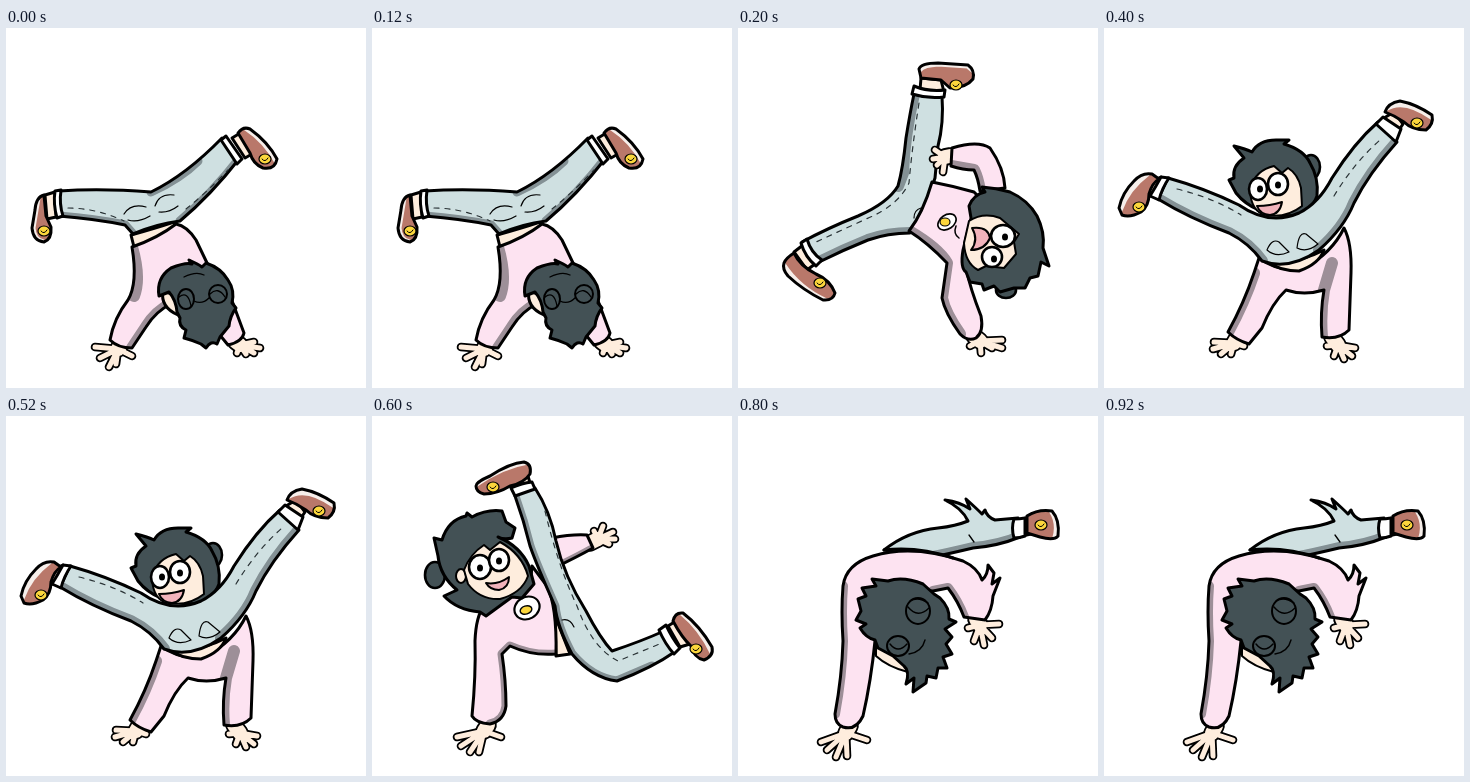
These frames come from a looping animation (360 px wide and 360 px high, 1000 ms). An HTML page with a canvas:

```html
<!DOCTYPE html>
<html lang="en">
<head>
<meta charset="utf-8">
<title>Cartwheel</title>
<style>
html, body { margin: 0; height: 100%; overflow: hidden; background: #fff; }
canvas { display: block; width: 360px; height: 360px; }
</style>
</head>
<body>
<canvas id="stage" width="360" height="360"></canvas>
<script>
const g = document.getElementById('stage').getContext('2d');
g.lineJoin = g.lineCap = 'round';

const SKIN = '#feeddd', PINK = '#fde3f1', BLUE = '#cfe0e1', HAIR = '#435155',
      SHOE = '#b9786a', WHITE = '#fff', YOLK = '#fbd63c', TONGUE = '#f2b3bb',
      SHADE = { [PINK]: '#9d8f98', [BLUE]: '#849195', [SHOE]: '#f6eeea' };

function line(d, width = 2, color = '#000') {
  g.strokeStyle = color;
  g.lineWidth = width;
  g.stroke(new Path2D(d));
}

function dashes(d) {
  g.setLineDash([5, 6]);
  line(d, 1.2, '#2a3336');
  g.setLineDash([]);
}

// Outlined shape; the optional edge is a band clipped to its inside.
function part(color, d, edge, band = 12, width = 3) {
  const path = new Path2D(d);
  g.fillStyle = color;
  g.fill(path);
  if (edge) {
    g.save();
    g.clip(path);
    line(edge, band, SHADE[color]);
    g.restore();
  }
  line(d, width);
}

function oval(color, x, y, rx, ry = rx, width = 2, turn = 0) {
  g.beginPath();
  g.ellipse(x, y, rx, ry, turn, 0, 7);
  if (color) { g.fillStyle = color; g.fill(); }
  if (width) { g.strokeStyle = '#000'; g.lineWidth = width; g.stroke(); }
}

function eye(x, y, rx, ry, px, py) {
  oval(WHITE, x, y, rx, ry, 2.6);
  oval('#000', px, py, 3, 3.6, 0);
}

function shoe(d, sole, x, y) {
  part(SHOE, d, sole, 7);
  oval(YOLK, x, y, 6, 5, 1.2);
  line(`M${x - 3},${y}q3,4 6,-1`, 1);
}

function hand(wrist, palm, ...tips) {
  const fingers = tips.map(t => `M${palm}L${t}`).join('');
  for (const [color, grow] of [['#000', 3.6], [SKIN, 0]]) {
    line(`M${wrist}L${palm}`, 14 + grow, color);
    line(fingers, 5 + grow, color);
  }
}

const poses = [
  () => {
    hand('116,314', '112,321', '89,319', '94,330', '103,339', '110,336', '126,328');
    hand('230,314', '234,317', '231,325', '240,326', '248,325', '254,320', '248,314');
    part(SKIN, 'M125,207Q150,200 168,194L171,198Q150,212 128,219Z');
    part(PINK, 'M126,219Q152,210 170,196Q181,198 190,212L202,237L222,262L238,305Q236,314 222,317L200,290L165,276Q150,283 140,299L126,320Q112,320 104,312Q108,290 122,272Q132,255 126,219Z',
      'M126,219Q135,250 128,268M126,320L140,299Q150,283 165,276');
    part(BLUE, 'M53,163Q95,160 145,164Q180,147 216,110L233,131Q205,167 174,193Q150,196 127,206L119,197Q90,191 53,188Z',
      'M53,188Q90,191 119,197L127,206M233,131Q205,167 174,193M145,164Q175,150 192,133', 9);
    dashes('M62,180Q90,180 118,193');
    dashes('M180,181Q200,165 222,142');
    line('M118,186Q125,175 140,179M122,192Q132,195 144,188M149,178Q153,165 168,167M153,184Q163,185 172,178', 1.2);
    part(SKIN, 'M39,167L49,164L50,189L41,191Z');
    part(WHITE, 'M49,163L55,162Q53,176 57,188L51,190Q47,176 49,163Z');
    shoe('M38,167Q30,169 29,182L26,200Q27,213 38,214Q46,211 45,199L40,188Z', 'M31,170L26,200Q27,213 37,215', 38, 203);
    part(SKIN, 'M226,110L236,104L246,126L239,130Z');
    part(WHITE, 'M215,112L220,108L236,131L231,136Z');
    shoe('M232,105Q237,98 244,101Q262,114 271,131Q269,142 257,140Q247,136 244,125Z', 'M240,99Q260,112 272,134', 259, 131);
    part(SKIN, 'M157,263Q154,279 172,287L178,270Z');
    part(HAIR, 'M153,268Q150,250 165,240Q180,234 186,236L183,232Q192,236 196,239L200,235Q215,240 222,252Q229,262 226,275L230,280Q224,288 223,298L214,309L211,316Q205,312 200,320L195,316Q186,312 178,310L180,302Q172,298 174,290L171,284Q170,272 163,264Z');
    oval(null, 180, 271, 8, 10);
    oval(null, 212, 266, 9);
    line('M173,269Q182,262 185,278M204,266Q212,258 219,269M188,273Q196,277 203,270M178,249Q190,243 198,247', 1.3);
  },
  () => {
    part(SKIN, 'M183,50L203,52L206,64L182,62Z');
    shoe('M181,41Q183,35 200,35L230,37Q237,42 235,51Q228,60 212,60L203,52L183,50Z', 'M181,41Q185,36 200,35L230,37L236,42', 218, 57);
    part(BLUE, 'M176,66Q190,70 204,68Q206,95 200,118L197,150Q190,175 172,205Q150,205 130,212Q105,222 79,235Q68,226 64,214Q90,200 120,188Q150,175 160,158Q165,140 168,110Q172,85 176,66Z',
      'M176,66Q166,110 165,145L160,158M172,205Q150,205 130,212Q105,222 79,235');
    dashes('M181,75Q174,120 171,155Q160,178 128,191L78,214');
    line('M183,180Q176,182 176,190', 1.2);
    part(WHITE, 'M176,58Q190,64 207,62L206,69Q190,71 174,66Z');
    part(SKIN, 'M56,224L65,217Q69,230 77,236L69,242Z');
    part(WHITE, 'M63,215L69,211Q73,225 84,232L78,238Q67,229 63,215Z');
    shoe('M46,235Q48,230 56,225Q62,238 78,246Q92,252 97,265Q95,273 85,272Q65,262 50,248Q44,241 46,235Z', 'M45,238Q60,261 88,274', 82, 255);
    hand('236,308', '242,313', '232,318', '243,325', '254,320', '264,320', '264,312');
    part(PINK, 'M194,154Q215,158 236,164L242,170L228,240Q232,260 243,288Q246,304 238,310Q230,314 222,306Q207,285 204,270L209,235Q190,215 171,203Q185,185 194,154Z',
      'M171,203Q200,220 209,235L204,270Q207,285 222,306');
    hand('212,128', '207,129', '197,122', '195,131', '199,137', '205,144');
    part(PINK, 'M214,120Q240,112 252,120Q266,140 267,160L242,163Q240,150 236,142Q225,142 213,138Z',
      'M213,138L236,142Q240,150 242,163');
    oval(WHITE, 209, 194, 10, 7, 1.6, -.6);
    oval(YOLK, 207, 194, 5, 4, 1.2);
    line('M218,198Q215,206 221,210', 1.5);
    oval(HAIR, 268, 262, 10, 8, 2.6);
    part(HAIR, 'M233,190L231,178Q236,166 247,164L244,159Q258,160 272,164Q290,172 299,188Q307,204 305,220L311,238L303,234L300,248L292,250L287,260L276,260L262,264L256,258L246,262L244,256L232,254L228,244Q222,240 225,222Z');
    part(SKIN, 'M231,193Q245,184 262,190L281,206L276,214L278,226L266,240L248,238L240,242Q227,235 226,215Z', null, 0, 2);
    part(TONGUE, 'M234,200Q250,198 252,210Q247,222 233,222Q241,212 234,200Z', null, 0, 2);
    eye(265, 208, 12, 11, 267, 209);
    eye(254, 229, 10, 10, 256, 231);
  },
  () => {
    hand('134,308', '130,315', '110,314', '109,321', '117,326', '127,326', '140,318');
    hand('228,309', '234,317', '223,318', '230,328', '240,331', '248,328', '251,320');
    part(PINK, 'M155,230Q175,245 200,240Q228,225 240,200Q248,215 247,245L245,302Q235,312 218,309Q216,285 220,262Q200,268 182,262Q168,275 158,300L145,316Q132,312 124,304Q140,275 150,245Z',
      'M124,304Q140,275 150,245M218,309Q216,285 220,262L228,235');
    part(SKIN, 'M160,232Q190,238 220,222Q215,236 195,243Q175,243 160,232Z');
    oval(HAIR, 207, 139, 9, 12, 2.6);
    part(HAIR, 'M132,165L125,152L130,150Q128,138 140,130L130,118Q142,121 148,124Q155,112 172,112L185,112L180,116Q200,122 206,135Q215,150 213,168Q208,182 190,188Q150,188 132,165Z');
    part(SKIN, 'M146,160Q152,142 170,138L178,145L184,140Q194,146 197,160L198,178Q180,192 158,186Q146,180 146,160Z', null, 0, 2);
    eye(154, 161, 9, 11, 156, 161);
    eye(174, 156, 10, 11, 174, 157);
    part(TONGUE, 'M153,178Q166,178 178,174Q176,186 166,187Q156,186 153,178Z', null, 0, 2);
    part(BLUE, 'M64,150Q100,160 135,177Q165,198 195,185Q215,175 228,150Q250,115 274,94L293,114Q265,145 250,175Q240,200 215,222Q185,243 158,233Q145,215 125,205Q85,190 54,171Z',
      'M54,171Q85,190 125,205Q145,215 158,233M293,114Q265,145 250,175Q240,200 215,222');
    dashes('M73,161Q110,170 137,187');
    dashes('M230,168Q250,135 276,112');
    line('M163,222Q168,210 175,214L185,224Q172,230 163,222M193,220Q195,203 202,206L214,216Q203,225 193,220', 1.2);
    part(SKIN, 'M46,154L57,149L54,168L44,168Z');
    part(WHITE, 'M57,149L65,150Q58,160 55,172L46,168Q51,160 57,149Z');
    shoe('M15,180Q18,165 30,153Q38,144 48,146L55,151Q48,155 45,166Q45,178 37,184Q26,190 18,187Z', 'M15,182Q23,160 43,145', 35, 179);
    part(SKIN, 'M280,90L290,84L299,96L295,102Z');
    part(WHITE, 'M272,96L279,89L297,101L292,114Z');
    shoe('M281,84Q284,75 296,73Q312,76 328,87Q330,96 322,102Q308,102 300,94L290,88Z', 'M281,80Q300,68 329,89', 313, 95);
  },
  () => {
    hand('218,127', '226,123', '222,115', '231,110', '241,116', '243,123', '237,128');
    part(PINK, 'M180,122Q200,118 215,119L221,132Q205,141 180,153Z', 'M221,132Q205,141 180,153', 8);
    hand('116,309', '112,315', '85,321', '89,330', '98,336', '107,336', '129,321');
    part(SKIN, 'M183,200L198,238L184,240Z');
    part(PINK, 'M112,190Q130,175 158,172L160,150L175,170Q185,190 184,238Q160,240 138,230L130,238Q134,265 134,290Q132,305 118,308Q104,307 100,300Q104,260 103,225Q104,200 112,190Z',
      'M184,238Q160,240 138,230L130,238Q134,265 134,290Q132,305 118,308', 9);
    oval(WHITE, 155, 192, 13, 11, 2.2, -.5);
    oval(YOLK, 154, 194, 6, 4, 1.4, -.3);
    oval(HAIR, 63, 159, 10, 13, 2.6);
    part(HAIR, 'M66,140L62,122L70,124Q76,104 94,100L95,97L100,101Q115,93 130,95L134,106L143,112L140,122Q132,124 126,121Q148,130 157,150L162,168L150,182L140,181L114,200L108,196Q85,194 72,180L85,174Q68,160 66,140Z');
    oval(SKIN, 89, 160, 5, 7);
    part(SKIN, 'M92,154Q98,138 112,129L118,134L128,126Q150,138 156,160Q150,177 128,183Q108,184 96,168Z', null, 0, 2);
    eye(108, 151, 11, 12, 108, 152);
    eye(127, 144, 10, 11, 127, 145);
    part(TONGUE, 'M114,167Q126,169 137,161Q137,172 127,174Q118,174 114,167Z', null, 0, 2);
    part(SKIN, 'M136,63L155,57L159,70L141,75Z');
    part(BLUE, 'M143,80Q152,72 163,72Q178,95 184,125Q192,160 214,195Q228,222 240,235Q270,225 292,215Q298,222 304,235Q280,252 245,265Q220,262 200,238Q185,210 183,190Q165,150 158,130Q152,105 143,80Z',
      'M143,80Q152,105 158,130Q165,150 183,190Q185,210 200,238Q220,262 245,265L280,250', 9);
    dashes('M173,95Q186,150 205,190Q220,232 246,245L290,227');
    line('M190,204Q198,202 202,211', 1.2);
    part(WHITE, 'M139,72Q150,67 160,66L163,73L143,80Z');
    shoe('M104,70Q104,66 118,60Q138,47 152,46Q160,48 158,58Q152,67 138,70Q125,78 112,78Q104,76 104,70Z', 'M103,68Q130,49 156,45', 121, 71);
    part(SKIN, 'M296,210L304,205L318,228L308,231Z');
    part(WHITE, 'M287,214L294,209Q300,222 308,232L302,238Q293,228 287,214Z');
    shoe('M301,205Q303,196 311,197Q328,210 340,231Q342,240 332,244Q322,242 319,230Q310,222 301,205Z', 'M309,195Q330,212 342,238', 324, 233);
  },
  () => {
    part(BLUE, 'M146,134Q170,115 200,112Q218,110 230,105Q224,92 207,84Q222,86 232,93L228,83Q238,92 244,98L247,94Q249,101 257,104L280,102L282,121Q260,130 235,132Q210,138 190,142Z',
      'M282,121Q260,130 235,132Q210,138 190,142');
    line('M231,119L236,126', 1.3);
    part(SKIN, 'M284,103L293,101L293,118L284,120Z');
    part(WHITE, 'M276,103Q282,103 287,102L287,120Q282,122 276,122Q273,112 276,103Z');
    shoe('M289,100Q300,93 314,95Q322,104 320,120Q316,125 302,121L289,117Z', 'M314,94Q323,108 317,125', 303, 109);
    hand('112,310', '108,317', '83,326', '89,334', '98,341', '109,340', '129,324');
    hand('238,203', '242,209', '230,212', '236,225', '246,229', '254,222', '261,208');
    part(PINK, 'M105,170Q108,148 135,140Q175,128 225,145Q240,152 244,164Q250,159 250,149L256,157L254,168L262,162L255,180Q254,195 247,204L226,201Q220,185 210,172L195,175Q170,172 150,180Q138,195 137,225Q133,265 125,300Q118,315 105,311Q97,308 97,298Q104,260 105,225Q103,195 105,170Z',
      'M97,298Q104,260 105,225Q103,195 105,170M226,201Q220,185 210,172L195,175', 10);
    line('M146,134Q180,130 215,142', 3);
    part(SKIN, 'M138,230L158,236L170,256Q150,251 138,240Z', null, 0, 2);
    part(HAIR, 'M120,183L128,180L124,172L138,170L134,163L150,165Q165,160 185,168L196,178L202,182Q212,192 211,203L218,206L207,213L214,221L208,228L214,238L205,241L209,252L200,252L198,262L189,260L188,267L175,276L176,262L168,268Q172,255 166,250L155,240L140,232L137,224Q128,222 122,212L128,208L118,204L123,195Z');
    oval(null, 180, 195, 12, 13);
    oval(null, 160, 230, 11, 10);
    line('M170,191Q180,203 191,192M152,228Q160,238 169,228M172,185Q180,180 190,187M171,238Q184,236 187,224', 1.4);
  }
];

function frame() {
  g.clearRect(0, 0, 360, 360);
  poses[Math.floor(performance.now() % 1000 / 200)]();
  requestAnimationFrame(frame);
}
frame();
</script>
</body>
</html>
```
